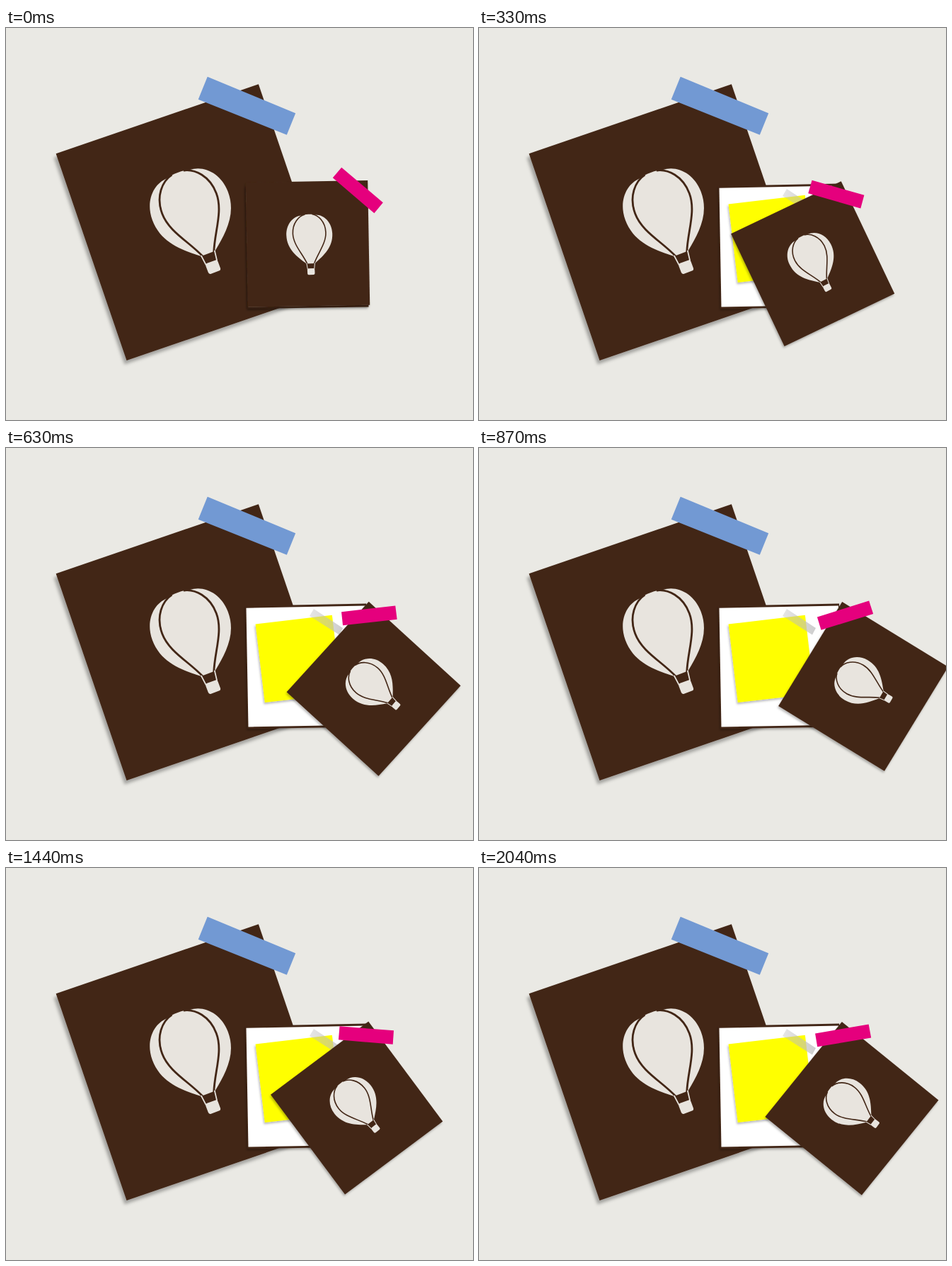
An HTML page for the animation above (2.07 s loop, 660 by 553 pixels).

```html
<!DOCTYPE html>
<html lang="en">
<head>
<meta charset="utf-8">
<title>Swinging card</title>
<style>
  html, body { margin: 0; width: 100%; height: 100%; overflow: hidden; background: #eae9e4; }
  svg { display: block; width: 660px; height: 553px; }
</style>
</head>
<body>
<svg viewBox="0 0 660 553">
  <defs>
    <filter id="deepShadow" x="-10%" y="-10%" width="120%" height="120%">
      <feDropShadow dx="-3" dy="5.5" stdDeviation="2.3" flood-color="#000" flood-opacity=".3"/>
    </filter>
    <filter id="softShadow" x="-10%" y="-10%" width="120%" height="120%">
      <feDropShadow dx="-1.2" dy="2.4" stdDeviation="1.4" flood-color="#000" flood-opacity=".28"/>
    </filter>
    <linearGradient id="clearTape">
      <stop offset="0" stop-color="#bdbdbd" stop-opacity=".38"/>
      <stop offset="1" stop-color="#bdbdbd" stop-opacity=".75"/>
    </linearGradient>
    <g id="balloon" fill="#e8e4de">
      <path d="M0 0C4 0 7 .4 9.5 1.3C22 1.5 32.5 13 32.5 28.5C32.5 48 19 59 6 69.5H-6C-19 59 -32.5 48 -32.5 28.5C-32.5 13 -22 1.5 -9.5 1.3C-7 .4 -4 0 0 0Z"/>
      <g fill="none" stroke="#432717" stroke-width="1.6">
        <path id="seam" d="M5 0C14 2 23.3 11.5 23.3 26.5C23.3 42 11 55 4.8 70"/>
        <use href="#seam" transform="scale(-1 1)"/>
      </g>
      <path d="M-5.8 69L-4.7 77.5M5.8 69L4.7 77.5" stroke="#e8e4de" stroke-width="1"/>
      <rect x="-5.2" y="76.5" width="10.4" height="9" rx="1.8"/>
    </g>
    <g id="card">
      <rect width="172.4" height="175.7" fill="#432717"/>
      <use href="#balloon" transform="translate(87.8 46.2) rotate(-1.7)"/>
    </g>
  </defs>

  <rect width="660" height="553" fill="#eae9e4"/>

  <g filter="url(#deepShadow)">
    <use href="#card" transform="translate(70.6 177.3) rotate(-18.9) scale(1.755)"/>
  </g>
  <path d="M284.7 68.7L409.2 120.2L396.8 150.8L271.7 100.8Z" fill="#7299d3"/>

  <path d="M338.5 223L509 219.5L512.5 393.5L341.5 396Z" fill="#432717" filter="url(#softShadow)"/>
  <path d="M339.5 225.8L508 222.5L511 390.5L342.5 393.5Z" fill="#fff"/>
  <path d="M352.6 248.6L460.8 235.8L474 346.5L365.8 359Z" fill="#ff0" filter="url(#softShadow)"/>
  <path d="M435 227L476 254L471 263.5L429 237Z" fill="url(#clearTape)"/>

  <g filter="url(#softShadow)">
    <g class="swing">
      <use href="#card" transform="translate(338.8 218.1) rotate(-1)"/>
    </g>
  </g>
  <path class="swing" d="M474.2 196.8L532.8 246.3L520.4 261.3L461.8 211.3Z" fill="#e5007d"/>
</svg>
<script>
  const LOOP = 2070, STEP = 30;
  const PIVOT = '514 214.2';
  // [time in ms, swing in degrees]
  const KEYS = [[0, 0], [810, 60], [1410, 35], [2040, 50]];
  const parts = document.querySelectorAll('.swing');

  function angleAt(time) {
    const i = Math.max(1, KEYS.findIndex(([t]) => t >= time));
    const [t0, a0] = KEYS[i - 1], [t1, a1] = KEYS[i];
    return a0 + (a1 - a0) * (time - t0) / (t1 - t0);
  }

  function draw(time) {
    const stepped = Math.floor((time % LOOP) / STEP) * STEP;
    const transform = `rotate(${-angleAt(stepped)} ${PIVOT})`;
    parts.forEach(part => part.setAttribute('transform', transform));
  }

  let start;
  function tick(now) {
    start ??= now;
    draw(Math.max(0, now - start));
    requestAnimationFrame(tick);
  }
  draw(0);
  requestAnimationFrame(tick);
</script>
</body>
</html>
```
